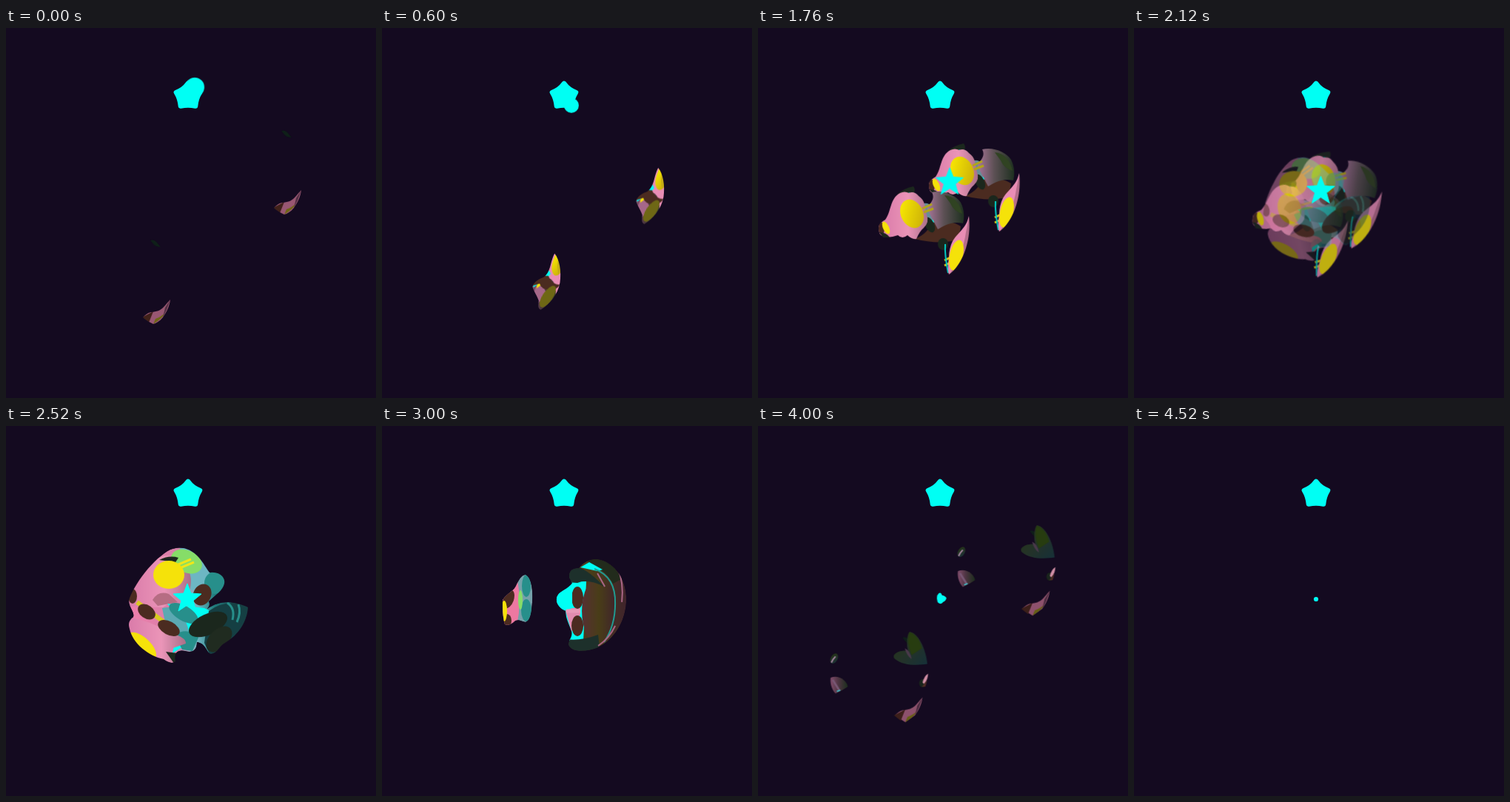
An HTML page without scripts that plays this animation: 500x500 px, repeating every 4.8 s.

```html
<!DOCTYPE html>
<html lang="en">
<head>
<meta charset="utf-8">
<title>Star bloom</title>
<style>
html, body { margin: 0; height: 100%; overflow: hidden; background: #140a20; }
svg { display: block; width: 100%; height: 100%; }
[class|="a"] { animation: 4.8s linear infinite; }
.cy { fill: #00fff4; } .pk { fill: #e98db5; } .ye { fill: #f5e20a; }
.br { fill: #4b2b20; } .dk { fill: #1b271d; } .te { fill: #278f8b; }
.ol { fill: #6e6715; } .gr { fill: #86dd68; }

/* twin copies drift together, then apart */
.a-far { animation-name: far; }
@keyframes far {
  0% { transform: translate(177px, -148px); }
  23.33% { transform: translate(108px, -88px); }
  36.67% { transform: translate(68px, -58px); }
  60% { transform: translate(0, 0); }
  74.17% { transform: translate(125px, -105px); }
  81.67%, 100% { transform: translate(172px, -144px); }
}

/* crescent */
.a-horn { animation-name: horn; }
@keyframes horn {
  0%, 100% { d: path("M222 367C221 376 217 384 212 391C208 396 203 399 199 400C197 399 195 398 193 397C190 395 187 393 185 391C188 388 191 385 196 384C212 383 213 376 222 367Z"); }
  23.33% { d: path("M243 251C256 257 265 282 265 304C263 330 247 352 228 364C222 362 225 356 228 344C227 334 223 328 219 314C221 303 230 300 238 296C243 283 239 264 243 251Z"); }
  36.67%, 60% { d: path("M285 254C286 263 286 275 284 285C280 307 270 325 258 333C256 325 257 317 258 310C258 302 260 294 263 288C268 280 272 277 276 272C281 266 283 262 285 254Z"); }
}
.a-base { animation-name: base; }
@keyframes base { 0%, 100% { fill: #985873; } 15%, 60% { fill: #e483ad; } }
.a-early { animation-name: early; }
@keyframes early {
  0% { opacity: 1; transform: none; }
  12% { opacity: 0; transform: translate(20px, -40px); }
  100% { opacity: 0; transform: translate(20px, -40px); }
}
.a-mid { animation-name: mid; transform-origin: 242px 308px; }
@keyframes mid {
  0% { opacity: 0; transform: translate(-39px, 77px) scale(.5) rotate(35deg); }
  10% { opacity: 1; }
  23.33% { opacity: 1; transform: none; }
  32%, 100% { opacity: 0; transform: translate(22px, -12px); }
}
.a-lens { animation-name: lens; }
@keyframes lens { 0%, 25% { opacity: 0; } 32%, 100% { opacity: 1; } }
.a-pair { animation-name: pair; transform-origin: 245px 270px; }
@keyframes pair {
  0%, 36.67% { opacity: 1; transform: none; }
  43% { opacity: 1; transform: rotate(8deg) scale(1.06); }
  48%, 99.9% { opacity: 0; transform: rotate(14deg); }
  100% { opacity: 0; transform: none; }
}
.a-fan { animation-name: fan; transform-origin: 245px 285px; }
@keyframes fan {
  0%, 24% { opacity: 0; transform: rotate(35deg) scale(.2); }
  28% { opacity: 1; }
  36.67%, 100% { opacity: 1; transform: none; }
}

/* merged body */
.a-dome { animation-name: dome; transform-origin: 245px 240px; }
@keyframes dome {
  0%, 42% { opacity: 0; transform: rotate(-16deg) scale(.88); }
  47% { opacity: 1; }
  52.5% { opacity: 1; transform: none; }
  56.5% { opacity: 1; transform: rotate(3deg) scale(.98, 1); }
  60.5%, 100% { opacity: 0; transform: rotate(6deg) scale(.9, 1); }
}
.a-split { animation-name: split; transform-origin: 246px 238px; }
@keyframes split {
  0%, 56.5% { opacity: 0; transform: scale(.86, 1); }
  60.5% { opacity: 1; }
  62.5% { opacity: 1; transform: none; }
  66% { opacity: 1; transform: scale(1.12, .95); }
  70.5%, 100% { opacity: 0; transform: scale(1.35, .8); }
}

/* scattered leaves */
.a-leaf { animation-name: leaf; transform-origin: 180px 305px; }
@keyframes leaf {
  0%, 66.5% { opacity: 0; transform: scale(.6); }
  72% { opacity: 1; }
  74.17% { opacity: 1; transform: none; }
  81.67% { opacity: 1; transform: translate(-20px, 18px) scale(.95); }
  94.1% { opacity: .8; transform: translate(-18px, 22px) scale(.78); }
  94.15%, 100% { opacity: 0; transform: scale(.78); }
}
.a-late { animation-name: late; transform-origin: 203px 385px; }
@keyframes late {
  0%, 75% { opacity: 0; transform: scale(.4); }
  84% { opacity: 1; transform: scale(1.06); }
  94.1% { opacity: 1; transform: none; }
  94.15%, 100% { opacity: 0; transform: none; }
}

/* travelling star */
.a-drop { animation-name: drop; }
@keyframes drop {
  0% { transform: translate(255px, 80px) scale(4.2); animation-timing-function: cubic-bezier(.45, 0, .75, .6); }
  23.33% { transform: translate(258px, 161px) scale(1); }
  36.67% { transform: translate(259px, 208px) scale(1); }
  52.5%, 100% { transform: translate(246px, 234px) scale(1); }
}
.a-star { animation-name: star; }
@keyframes star {
  0%, 23.33% { opacity: 1; transform: translate(258px, 161px) scale(0); }
  36.67% { transform: translate(259px, 208px) scale(.97); }
  52.5% { transform: translate(245px, 233px) scale(1); }
  59% { opacity: 1; transform: translate(245px, 233px) scale(1); }
  60.5%, 100% { opacity: 0; transform: translate(245px, 233px) scale(1); }
}
.a-chip { animation-name: chip; transform-origin: 246px 234px; }
@keyframes chip {
  0%, 67% { opacity: 0; transform: none; }
  70%, 74.17% { opacity: 1; transform: none; }
  92%, 94.17% { opacity: 1; transform: scale(.1); }
  94.2%, 100% { opacity: 0; transform: scale(.1); }
}
</style>
</head>
<body>
<svg viewBox="0 0 500 500">
  <defs>
    <linearGradient id="rose"><stop stop-color="#d878a8"/><stop offset=".6" stop-color="#eb95b8"/><stop offset="1" stop-color="#a97089"/></linearGradient>
    <linearGradient id="mauve"><stop stop-color="#a87599"/><stop offset=".45" stop-color="#5c5054"/><stop offset="1" stop-color="#1e3020"/></linearGradient>
    <linearGradient id="sea"><stop stop-color="#f07eac"/><stop offset=".4" stop-color="#d781a9"/><stop offset=".58" stop-color="#6fb5c2"/><stop offset=".72" stop-color="#207b7c"/><stop offset="1" stop-color="#122b30"/></linearGradient>
    <linearGradient id="bark"><stop stop-color="#573033"/><stop offset=".5" stop-color="#493d18"/><stop offset="1" stop-color="#40242c"/></linearGradient>
    <linearGradient id="moss" x2="1" y2="1"><stop stop-color="#263812"/><stop offset=".5" stop-color="#263529"/><stop offset="1" stop-color="#17323a"/></linearGradient>
    <linearGradient id="dusk"><stop stop-color="#86506f"/><stop offset=".45" stop-color="#513744"/><stop offset="1" stop-color="#1d301d"/></linearGradient>
    <linearGradient id="gold" x2="1" y2="1"><stop stop-color="#fff000"/><stop offset="1" stop-color="#c5a90b"/></linearGradient>
    <clipPath id="hornClip"><path class="a-horn"/></clipPath>
    <clipPath id="domeClip"><path id="domeEdge" d="M166 236C172 215 200 178 222 167C236 161 250 166 260 177C267 185 271 193 275 198C290 196 297 206 295 213C293 222 284 228 274 237C277 243 272 246 272 247C290 235 306 236 327 245C326 263 315 282 296 293C288 297 287 306 277 308C270 306 271 294 258 292C258 303 252 307 242 304C234 302 226 305 229 318C224 322 219 319 213 315C193 311 171 294 167 274C165 267 166 263 172 258C174 252 167 247 166 236Z"/></clipPath>
    <clipPath id="petalClip"><path id="petalEdge" d="M163 235C170 225 179 223 182 214C186 205 190 201 194 201C203 206 204 225 203 238C202 252 200 263 194 265C188 264 184 261 180 263C175 268 170 270 166 268C163 258 163 245 163 235Z"/></clipPath>
    <clipPath id="shellClip"><path id="shellEdge" d="M253 205C252 196 257 192 266 192C272 184 280 180 290 180C313 183 330 205 330 234C330 262 315 288 292 299C278 305 255 307 252 295C253 287 258 285 256 277C252 266 248 259 248 250C240 246 235 240 236 233C238 222 250 223 257 212Z"/></clipPath>

    <g id="sliver">
      <path fill="#985873" d="M222 367C221 376 217 384 212 391L199 400L185 391Q191 385 196 384C212 383 213 376 222 367Z"/>
      <path fill="#40221a" d="M184 391L199 383L193 398Z"/>
      <path class="ol" d="M199 400Q212 392 215 385Q210 390 202 393Z"/>
      <path fill="#503044" d="M222 367L217 381L212 391L215 378Z"/>
    </g>
    <path id="speck" fill="#10201a" d="M195 287Q200 285 204 290L209 296Q202 296 199 292Z"/>
    <g id="dart"><use href="#sliver"/><use href="#speck"/></g>

    <g id="fan">
      <path class="dk" d="M188 225Q196 217 210 214Q214 219 209 226L195 231Z"/>
      <path class="cy" d="M203 222Q216 224 226 240Q235 235 247 262Q246 272 228 264L222 240Z"/>
      <path fill="#668f9a" d="M224 237Q237 235 240 257L229 263Z"/>
      <path class="br" d="M238 262C250 262 262 260 274 268Q272 286 262 288Q240 292 212 285C225 280 230 272 238 262Z"/>
      <path fill="url(#mauve)" d="M235 222C250 218 268 226 274 236C279 246 279 256 277 264C262 260 250 268 243 272C238 262 232 252 229 244C232 236 240 232 235 222Z"/>
      <ellipse class="dk" cx="232" cy="266" rx="6" ry="11" transform="rotate(-25 232 266)"/>
      <ellipse class="dk" cx="250" cy="292" rx="7" ry="8"/>
      <path fill="#304322" d="M252 226Q271 228 276 251Q264 247 260 237Z"/>
      <path fill="url(#rose)" d="M172 259C180 249 178 230 192 223Q198 220 204 223Q211 220 217 227C226 233 226 242 228 253Q232 262 224 270Q218 275 214 285Q208 286 202 280Q195 286 189 280Q178 284 170 282Q162 280 163 268Q166 262 172 259Z"/>
      <ellipse fill="url(#gold)" cx="208" cy="251" rx="15" ry="20" transform="rotate(-25 208 251)"/>
      <ellipse class="br" cx="167" cy="271" rx="4" ry="8"/>
      <ellipse class="ye" cx="173" cy="270" rx="4" ry="9" transform="rotate(-25 173 270)"/>
      <path class="dk" d="M164 276Q173 276 178 283H169Z"/>
      <path d="M222 244L235 238M224 249L237 244" stroke="#b3a619" stroke-width="3"/>
      <path d="M252 314L262 309M252 321L260 317" stroke="#dccc10" stroke-width="3"/>
      <path d="M253 292Q252 306 257 331" fill="none" stroke="#00cfc7" stroke-width="2"/>
    </g>
    <g id="mid">
      <path fill="url(#dusk)" d="M215 300H270V370H215Z"/>
      <path class="pk" d="M238 250H270L263 330Q257 300 240 300Z"/>
      <path fill="url(#gold)" d="M242 250Q255 258 260 282Q258 293 250 293Q238 286 241 263Z"/>
      <path d="M250 265Q251 276 257 287" fill="none" stroke="#c3a818" stroke-width="3"/>
      <path class="cy" d="M238 287L243 292L237 304L220 324L218 312Z"/>
      <path fill="#a66789" d="M225 317Q242 316 245 330L230 360L222 350Z"/>
      <path class="ye" d="M225 312L233 315L226 324Z"/>
      <path class="br" d="M217 313Q225 299 240 297Q250 310 264 306Q259 321 242 321Q234 321 229 314L219 321Z"/>
      <ellipse class="ol" cx="249" cy="332" rx="9" ry="22" transform="rotate(18 249 332)"/>
      <path class="dk" d="M221 356Q231 360 239 354L228 367Z"/>
    </g>
    <g id="lens">
      <path class="pk" d="M250 250H292V340H250Z"/>
      <path fill="#b56d8b" d="M286 252V287Q278 314 258 334Q277 306 281 276Z"/>
      <ellipse class="ye" cx="268" cy="307" rx="9" ry="21" transform="rotate(13 268 307)"/>
    </g>
    <g id="leaves">
      <ellipse fill="url(#moss)" cx="118" cy="295" rx="5" ry="8" transform="rotate(28 118 295)"/>
      <path d="M114 301Q116 296 120 292" fill="none" stroke="#b08caa" stroke-width="2"/>
      <path fill="url(#dusk)" d="M113 323C125 318 137 328 138 336Q129 342 120 346C114 340 112 330 113 323Z"/>
      <path d="M116 326L126 342" stroke="#7c5b78" stroke-width="3"/>
      <path d="M122 343L127 341" stroke="#44b8c0" stroke-width="2"/>
      <path fill="url(#moss)" d="M228 256C240 257 252 280 254 303C240 305 219 306 206 295C201 288 215 282 226 284C223 275 224 260 228 256Z"/>
      <path fill="#4c3b4c" d="M221 280Q229 283 231 296Q224 291 221 280Z"/>
      <path fill="#293e10" d="M228 257Q242 262 246 280Q237 286 231 290Q223 270 228 257Z"/>
      <ellipse class="dk" cx="247" cy="331" rx="5" ry="6"/>
      <path fill="#d692a9" d="M255 317Q255 326 249 332L247 330Q249 321 255 317Z"/>
      <path fill="#512e25" d="M254 326L251 336L246 336Z"/>
    </g>
  </defs>

  <path fill="#140a20" d="M0 0H500V500H0Z"/>
  <path class="cy" stroke="#00fff4" stroke-width="6.6" stroke-linejoin="round" d="M246 75Q252 83.5 262 87Q257 95 256 105.5Q246 103.5 236 105.5Q235 95 230 87Q240 83.5 246 75Z"/>

  <g class="a-far">
    <g class="a-pair">
      <use href="#speck" class="a-early"/>
      <use href="#fan" class="a-fan"/>
      <g clip-path="url(#hornClip)">
        <path class="a-base" d="M150 200H330V430H150Z"/>
        <use href="#sliver" class="a-early"/>
        <use href="#mid" class="a-mid"/>
        <use href="#lens" class="a-lens"/>
      </g>
    </g>
    <use href="#dart" class="a-late"/>
    <use href="#leaves" class="a-leaf"/>
  </g>
  <g class="a-pair">
    <use href="#speck" class="a-early"/>
    <use href="#fan" class="a-fan"/>
    <g clip-path="url(#hornClip)">
      <path class="a-base" d="M150 200H330V430H150Z"/>
      <use href="#sliver" class="a-early"/>
      <use href="#mid" class="a-mid"/>
      <use href="#lens" class="a-lens"/>
    </g>
  </g>
  <use href="#dart" class="a-late"/>
  <use href="#leaves" class="a-leaf"/>

  <g class="a-dome"><g clip-path="url(#domeClip)">
    <use href="#domeEdge" fill="url(#sea)"/>
    <path fill="#6db6c3" d="M235 165H270L278 215L250 222Z"/>
    <path fill="url(#rose)" d="M160 240Q190 165 232 176Q256 197 248 222L212 245L165 244Z"/>
    <ellipse class="gr" cx="244" cy="183" rx="22" ry="15" transform="rotate(25 244 183)"/>
    <path d="M233 187L250 180M237 191L254 184" stroke="#f0e719" stroke-width="3"/>
    <path class="dk" d="M207 181Q221 174 233 178L229 184Z"/>
    <ellipse class="ye" cx="220" cy="201" rx="21" ry="19"/>
    <path fill="#b66d83" d="M198 235Q206 222 220 227L232 238L205 243Z"/>
    <ellipse class="te" cx="282" cy="212" rx="14" ry="15"/>
    <ellipse class="br" cx="265" cy="228" rx="12" ry="15" transform="rotate(25 265 228)"/>
    <path class="cy" d="M218 240L268 246L278 251L270 277L252 290L225 307L228 292Q248 277 218 240Z"/>
    <path fill="#5ba9b2" d="M211 246Q238 239 247 277L240 290L220 288Z"/>
    <ellipse class="te" cx="240" cy="253" rx="22" ry="10" transform="rotate(30 240 253)"/>
    <path class="te" d="M228 282Q246 271 260 286L252 304L238 302Z"/>
    <path fill="url(#rose)" d="M165 258Q195 263 224 280Q244 286 243 294L220 302L229 320L160 310Z"/>
    <path d="M177 238L215 266" stroke="#d8ca20" stroke-width="6"/>
    <ellipse class="br" cx="171" cy="230" rx="6" ry="10"/>
    <ellipse class="br" cx="190" cy="251" rx="13" ry="9" transform="rotate(35 190 251)"/>
    <ellipse class="br" cx="220" cy="273" rx="16" ry="9" transform="rotate(28 220 273)"/>
    <ellipse class="ye" cx="184" cy="297" rx="24" ry="11" transform="rotate(43 184 297)"/>
    <path class="dk" d="M216 305L232 307L228 322Z"/>
    <path fill="#153f43" d="M274 250Q298 232 330 244L315 285L276 310L268 293Z"/>
    <path d="M299 239Q310 246 306 262M314 241Q318 252 312 265" fill="none" stroke="#278f8b" stroke-width="3"/>
    <ellipse class="dk" cx="273" cy="268" rx="28" ry="14" transform="rotate(-25 273 268)"/>
    <ellipse fill="#202b20" cx="288" cy="288" rx="21" ry="13" transform="rotate(-45 288 288)"/>
  </g></g>

  <g class="a-split">
    <g clip-path="url(#petalClip)">
      <use href="#petalEdge" fill="#75a1aa"/>
      <path fill="#ed78a1" d="M160 200H181Q190 235 182 270H160Z"/>
      <ellipse class="br" cx="171" cy="234" rx="7" ry="13" transform="rotate(20 171 234)"/>
      <ellipse class="br" cx="169" cy="263" rx="6" ry="9"/>
      <ellipse class="ye" cx="165" cy="250" rx="4" ry="14"/>
      <ellipse class="te" cx="195" cy="216" rx="6" ry="15"/>
      <ellipse class="te" cx="195" cy="249" rx="7" ry="15"/>
      <ellipse class="gr" cx="187" cy="235" rx="3" ry="13"/>
    </g>
    <g clip-path="url(#shellClip)">
      <use href="#shellEdge" fill="url(#bark)"/>
      <path class="cy" d="M230 210H276L272 290H250L248 248H230Z"/>
      <path fill="#e28baf" d="M247 246H268V254L256 278Z"/>
      <ellipse class="br" cx="264" cy="232" rx="8" ry="15"/>
      <ellipse class="br" cx="264" cy="270" rx="8" ry="14"/>
      <path class="cy" d="M232 212L257 216V246L246 250H232Z"/>
      <path d="M249 250H268" stroke="#e99ab9" stroke-width="5"/>
      <ellipse fill="url(#bark)" cx="293" cy="250" rx="23" ry="46"/>
      <path fill="#1d302b" d="M248 190Q268 183 300 217Q278 206 264 212L250 211Z"/>
      <path fill="#1d302b" d="M248 288Q268 291 292 282L294 300L252 310Z"/>
      <path fill="#222b1c" d="M280 177Q311 178 323 207L312 213Q302 193 278 187Z"/>
      <path class="cy" d="M268 191L280 184L298 194L291 196Z"/>
      <path d="M287 193Q316 204 315 240Q315 270 300 292" fill="none" stroke="#219b91" stroke-width="2"/>
      <path d="M291 199L301 217M318 190Q327 212 324 238M292 297Q307 287 315 270" fill="none" stroke="#aa6686" stroke-width="2"/>
    </g>
  </g>

  <circle class="a-drop" fill="#00fff4" r="3.1"/>
  <path class="a-star" fill="#00fff4" stroke="#00fff4" stroke-linejoin="round" d="M0 -20L5 -7L19 -6L8 3L12 17L0 9L-12 17L-8 3L-19 -6L-5 -7Z"/>
  <path class="a-chip" fill="#00fff4" d="M243 219Q248 215 251 224Q262 227 262 232Q259 240 254 241Q250 247 245 245Q239 243 239 237Q236 225 243 219Z"/>
</svg>
</body>
</html>
```
